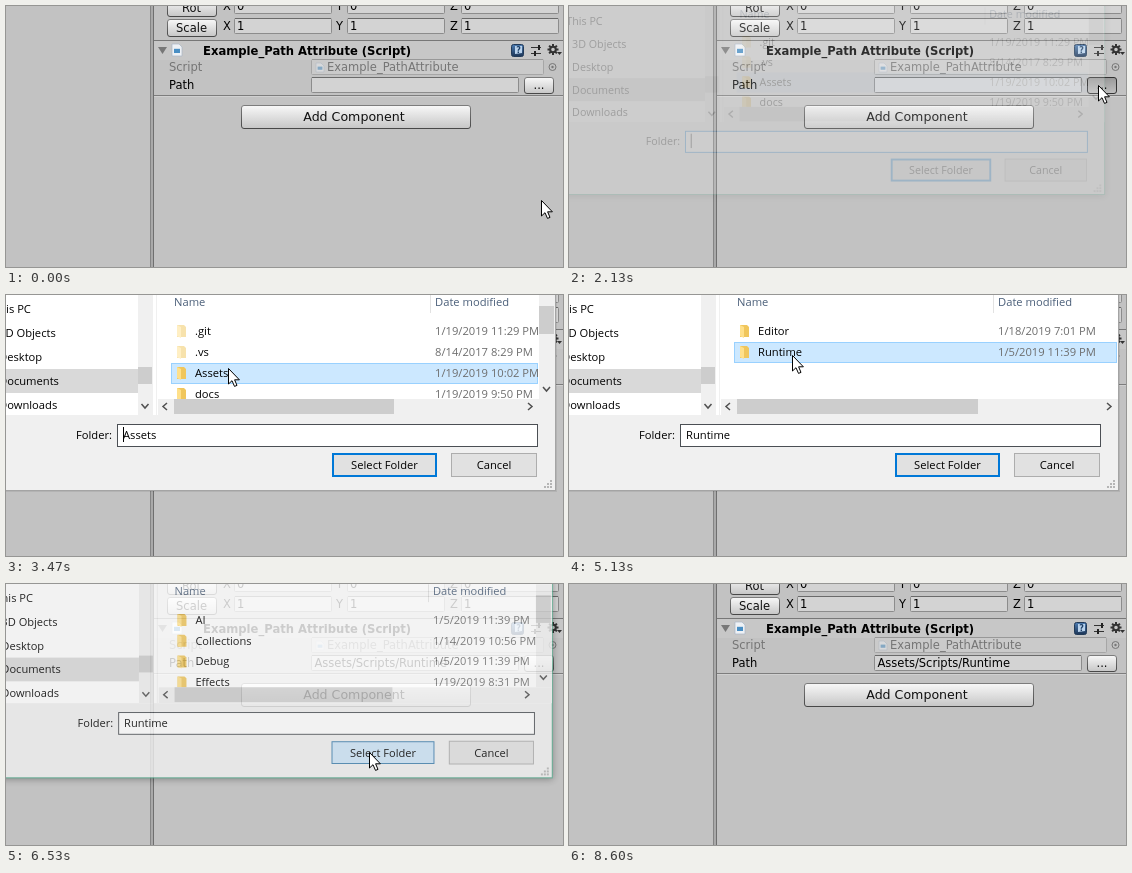
An HTML page that plays this animation: 557 px wide and 261 px high, repeating every 9870 ms.

```html
<!DOCTYPE html>
<html lang="en">
<head>
<meta charset="utf-8">
<title>Path attribute</title>
<style>
html, body { margin: 0; width: 557px; height: 261px; overflow: hidden; background: #c2c2c2; }
svg { display: block; }
text { font: 11.5px "DejaVu Sans", sans-serif; white-space: pre; }
.bold { font-weight: bold; font-size: 11.6px; }
.big { font-size: 12.6px; }
.dlg text { font: 11.2px "Open Sans", sans-serif; }
.moving { filter: drop-shadow(0 1px 4px rgba(0, 0, 0, .4)); }
</style>
</head>
<body>
<svg id="stage" width="557" height="261" viewBox="0 0 557 261"></svg>
<script>
const LOOP = 9870;
const stage = document.getElementById('stage');

// [time, x, y] of the pointer tip
const POINTER = [
  [0, 535, 194], [70, 520, 173], [130, 531, 183], [200, 531, 183], [530, 519, 168],
  [870, 509, 150], [1200, 516, 128], [1530, 526, 85], [1600, 526, 85], [1800, 529, 79],
  [2600, 529, 79], [3270, 222, 73], [3930, 222, 73], [4200, 223, 60], [5400, 223, 60],
  [6270, 363, 168], [6870, 363, 168], [7400, 372, 153], [8070, 372, 153], [8600, 110, 262]
];
// [time, opacity, scale] of the dialog
const FADE = [
  [2070, 0, .95], [2130, .18, .957], [2200, .6, .98], [2270, .9, .995], [2330, 1, 1],
  [6470, 1, 1], [6530, .8, .99], [6600, .45, .97], [6670, .15, .955], [6730, 0, .95]
];
// folder contents: [start time, rows, vertical thumb height]
const LISTS = [
  [0, [['.git', '1/19/2019 11:29 PM', .5], ['.vs', '8/14/2017 8:29 PM', .5],
       ['Assets', '1/19/2019 10:02 PM'], ['docs', '1/19/2019 9:50 PM']], 28],
  [3600, [['Prefabs', '1/12/2019 4:16 PM'], ['Scripts', '1/19/2019 8:31 PM'],
          ['Settings', '1/5/2019 11:39 PM'], ['Textures', '1/14/2019 9:20 PM']], 38],
  [4470, [['Editor', '1/18/2019 7:01 PM'], ['Runtime', '1/5/2019 11:39 PM']], 0],
  [5330, [['AI', '1/5/2019 11:39 PM'], ['Collections', '1/14/2019 10:56 PM'],
          ['Debug', '1/5/2019 11:39 PM'], ['Effects', '1/19/2019 8:31 PM']], 28]
];
// [from, to, row, folder name]
const PICKS = [[3400, 3600, 2, 'Assets'], [4270, 4470, 1, 'Scripts'], [5130, 5330, 1, 'Runtime']];

const rect = (x, y, w, h, fill, more = '') =>
  `<rect x="${x}" y="${y}" width="${w}" height="${h}" fill="${fill}" ${more}/>`;
const box = (x, y, w, h, fill, line, more = '') =>
  rect(x + .5, y + .5, w - 1, h - 1, fill, `stroke="${line}" ${more}`);
const text = (x, y, s, fill = '#000', more = '') =>
  `<text x="${x}" y="${y}" fill="${fill}" ${more}>${s}</text>`;
const path = (d, fill, more = '') => `<path d="${d}" fill="${fill}" ${more}/>`;
const line = (d, color, width = 1) => path(d, 'none', `stroke="${color}" stroke-width="${width}"`);
const mid = 'text-anchor="middle"';

function track(keys, t) {
  const i = keys.findIndex(k => k[0] > t);
  if (i < 0) return keys[keys.length - 1].slice(1);
  if (i === 0) return keys[0].slice(1);
  const a = keys[i - 1], b = keys[i], u = (t - a[0]) / (b[0] - a[0]);
  return [a[1] + (b[1] - a[1]) * u, a[2] + (b[2] - a[2]) * u];
}

const gradient = (id, top, bottom) =>
  `<linearGradient id="${id}" x2="0" y2="1"><stop stop-color="${top}"/><stop offset="1" stop-color="${bottom}"/></linearGradient>`;
const DEFS = '<defs>' + gradient('btn', '#f8f8f8', '#c6c6c6') + gradient('edge', '#7c7c7c', '#484848') +
  gradient('down', '#999', '#c0c0c0') + gradient('book', '#4d7db3', '#1c3557') + '</defs>';

const button = (x, y, w, h, fill = 'url(#btn)', edge = 'url(#edge)') =>
  box(x, y, w, h, fill, edge, 'rx="2.5"');
const input = (x, y, w, h = 16) =>
  box(x, y, w, h, '#d3d3d3', '#8c8c8c', 'rx="1"') + rect(x + 1, y, w - 2, 1, '#6a6a6a');
const page = (x, y, w, h) =>
  path(`M${x} ${y}h${w - 3}l3 3v${h - 3}h${-w}z`, '#eef1f5', 'stroke="#a9b6c4" stroke-width=".7"') +
  rect(x + w * .2, y + h * .4, w * .6, h * .35, '#4a8fc4');

function icons() {
  let gear = '';
  for (let a = 0; a < 360; a += 45)
    gear += rect(546, 38, 2, 3, '#333', `transform="rotate(${a} 547 43.5)"`);
  return path('M152 41h9l-4.5 7z', '#777') + page(166, 38, 10, 12) +
    box(505, 38, 13, 13, 'url(#book)', '#223a58', 'rx="2"') + path('M509 40h7v7l-7 1z', '#b9d2ec') +
    text(512.5, 47, '?', '#1d3f66', mid + ' style="font-size:8px;font-weight:bold"') +
    line('M525 41.5h10M525 47.5h10', '#333') + rect(532, 39, 2, 5, '#222') + rect(528, 45, 2, 5, '#222') +
    gear + `<circle cx="547" cy="43.5" r="2.8" fill="none" stroke="#333" stroke-width="2"/>` +
    path('M551 46h5l-2.5 3z', '#333');
}

function inspector(t) {
  let s = rect(0, 0, 557, 261, '#c2c2c2') + rect(144, 0, 1, 261, '#858585') +
    rect(145, 0, 2, 261, '#a9a9a9') + rect(147, 0, 1, 261, '#6f6f6f');
  for (const [y, name, value] of [[-7, 'Rot', 0], [13, 'Scale', 1]]) {
    s += button(161, y, 50, 18) + text(185.5, y + 13, name, '#111', mid);
    ['X', 'Y', 'Z'].forEach((axis, i) => {
      const x = 228 + i * 113.5 | 0;
      s += text(x - 11, y + 11, axis) + input(x, y - 1, 98) + text(x + 3, y + 11, value);
    });
  }
  s += rect(148, 34, 409, 1, '#777') + rect(148, 35, 409, 19, '#c7c7c7') +
    rect(148, 89, 409, 1, '#7d7d7d') + rect(148, 90, 409, 1, '#d0d0d0') + icons() +
    text(197, 49, 'Example_Path Attribute (Script)', '#000', 'class="bold"') +
    text(163, 65, 'Script', '#757575') +
    `<g opacity=".5">${input(305, 53, 233)}${page(310, 57, 8, 9)}</g>` +
    text(321, 65, 'Example_PathAttribute', '#757575') +
    '<circle cx="546.5" cy="61" r="3.5" fill="none" stroke="#777"/><circle cx="546.5" cy="61" r="1.2" fill="#777"/>' +
    text(163, 83, 'Path') + input(305, 71, 208) +
    (t >= 6530 ? text(308.5, 83, 'Assets/Scripts/Runtime') : '');
  const held = t >= 1930 && t < 3000;
  return s + (held ? button(518, 71, 30, 17, 'url(#down)', '#333') : button(518, 71, 30, 17)) +
    text(533, 83, '...', '#111', mid) +
    button(235, 99, 230, 24) + text(348, 115, 'Add Component', '#111', mid + ' class="big"');
}

const folder = (y, alpha = 1) => `<g opacity="${alpha}">` +
  path(`M171 ${y - 6}h7l2 2v10h-9z`, '#f0c65c') + path(`M171 ${y - 6}l4 2v11l-4-2z`, '#ffe08a') + '</g>';

function listing(t, px, py) {
  const [, rows, thumb] = LISTS.filter(l => l[0] <= t).pop();
  const right = thumb ? 532 : 548;
  const pick = PICKS.find(p => t >= p[0] && t < p[1]);
  const hover = px > 165 && px < 533 && py < 103 ? Math.floor((py - 25.5) / 21) : -1;
  let s = text(168, 11, 'Name', '#4c607a') + text(429, 11, 'Date modified', '#4c607a') +
    rect(424, 0, 1, 18, '#e2e2e2');
  rows.forEach(([name, date, alpha], i) => {
    const y = 36 + i * 21;
    if (pick && pick[2] === i) s += box(165, y - 10, right - 165, 21, '#cce8ff', '#99d1ff');
    else if (hover === i) s += rect(165, y - 10, right - 165, 21, '#e5f3ff');
    s += folder(y, alpha) + text(189, y + 4, name) + text(429, y + 4, date, '#6d6d6d');
  });
  s += rect(152, 104, 397, 16, '#f0f0f0') + rect(168, 104, thumb ? 220 : 241, 15, '#cdcdcd') +
    line(`M161 108l-4 3.5 4 3.5M${right - 10} 108l4 3.5-4 3.5`, '#505050', 1.5);
  if (thumb) s += rect(533, 0, 16, 104, '#f0f0f0') + rect(533, 11, 15, thumb, '#cdcdcd') +
    line('M537 92l3.5 4 3.5-4', '#505050', 1.5);
  return s;
}

function dialog(t, px, py) {
  const [alpha, scale] = track(FADE, t);
  if (!alpha) return '';
  const moving = scale < 1;
  let s = moving ? '' : rect(-95, -130, 646, 327, '#000', 'opacity=".08"');
  s += box(-95, -131, 645, 327, '#f0f0f0', moving ? '#49a585' : '#a4a4a4') +
    rect(-94, -130, 643, 250, '#fff') + rect(-94, 74, 226, 24, '#d9d9d9');
  ['This PC', '3D Objects', 'Desktop', 'Documents', 'Downloads'].forEach((name, i) => {
    s += text(i ? -7 : -13, 18 + i * 24, name);
  });
  s += rect(132, -130, 15, 250, '#f0f0f0') + rect(132, 72, 14, 17, '#cdcdcd') +
    line('M135.5 109l3.5 4 3.5-4', '#505050', 1.5) + rect(150, -130, 1, 250, '#f0f0f0') +
    listing(t, px, py);

  const named = PICKS.filter(p => p[0] <= t).pop();
  s += text(70, 144, 'Folder:') + box(111, 129, 421, 23, '#fff', t < 2300 ? '#0078d7' : '#4b4f54') +
    (named ? text(117, 144, named[3]) : '');
  if (t < 3730 && Math.floor((t - 2100) / 530) % 2 === 0) s += rect(117, 132, 1, 15, '#000');

  const over = px > 326 && px < 431 && py > 158;
  const pressed = t >= 6400;
  const fill = pressed ? '#cce4f7' : over ? '#e5f1fb' : '#e1e1e1';
  s += rect(327, 159, 103, 22, fill, pressed ? 'stroke="#3f7fae"' : 'stroke="#0078d7" stroke-width="2"') +
    text(378.5, 174, 'Select Folder', '#000', mid) +
    box(445, 158, 86, 24, '#e1e1e1', '#adadad') + text(488, 174, 'Cancel', '#000', mid);
  for (let i = 0; i < 3; i++)
    for (let j = 0; j <= i; j++) s += rect(544 - j * 3, 185 + i * 3, 2, 2, '#b5b5b5');
  return `<g class="dlg${moving ? ' moving' : ''}" opacity="${alpha}" transform="translate(227 32) scale(${scale}) translate(-227 -32)">${s}</g>`;
}

const pointer = (x, y) => path('M.5 .5V16L4 12.7 6.5 18.4 9 17.4 6.6 11.8H11.4Z', '#fff',
  `stroke="#000" transform="translate(${Math.round(x)} ${Math.round(y)})"`);

let shown = -1;
function draw(now) {
  const clock = Math.floor((now % LOOP) / 10) * 10 + 4;
  const step = Math.floor(clock * 15 / 1000);
  if (step !== shown) {
    shown = step;
    const t = Math.round(step * 20 / 3) * 10;
    const [x, y] = track(POINTER, t);
    stage.innerHTML = DEFS + inspector(t) + dialog(t, x, y) + pointer(x, y);
  }
  requestAnimationFrame(() => draw(performance.now() - start));
}
const start = performance.now();
draw(0);
</script>
</body>
</html>
```
